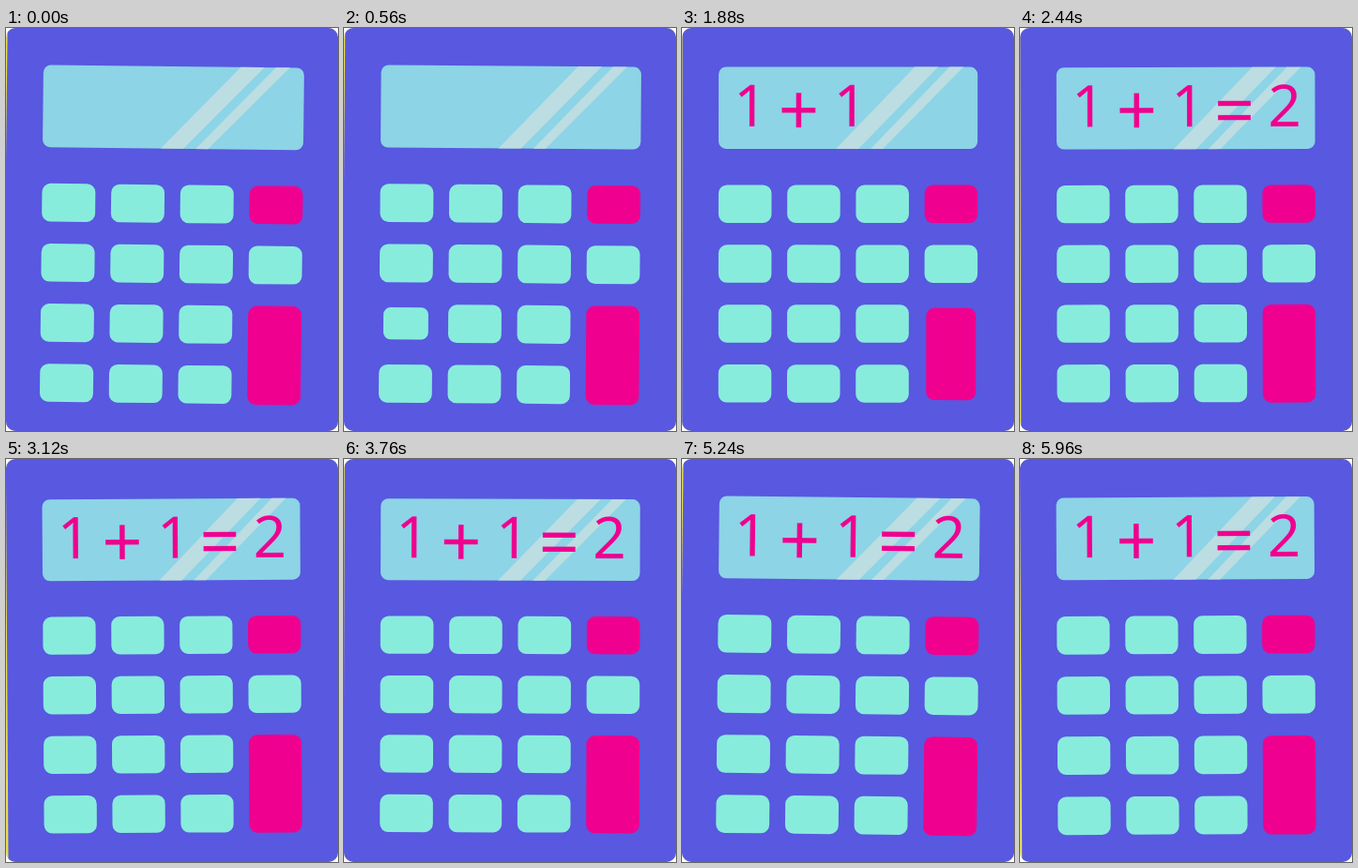
An HTML page that plays this animation: 354x430 px, repeating every 6 s.

```html
<!DOCTYPE html>
<html lang="en">
<head>
<meta charset="utf-8">
<title>Calculator</title>
<style>
  html, body { margin: 0; width: 100%; height: 100%; overflow: hidden; background: #fff; }
  svg { display: block; width: 354px; height: 430px; background: #e8dc50; border-radius: 10px; }
  text { font-family: "Noto Sans", "Open Sans", sans-serif; font-size: 62px; fill: #ef008f; text-anchor: middle; }
  .op { font-size: 76px; }
</style>
</head>
<body>
<svg viewBox="0 0 354 430">
  <g id="body">
    <rect x=".5" y="-6" width="358" height="442" rx="10" fill="#5858e0"/>
    <rect x="39" y="41.5" width="276" height="87.5" rx="8" fill="#8cd4e6"/>
    <path d="M248 41.5h25L188 129h-24zM285 41.5h15L214 129h-13z" fill="#bcdde2"/>
    <g id="keys"></g>
    <g id="display"></g>
  </g>
</svg>
<script>
const LOOP = 6000, FRAME = 40, PRESS = 320;
const $ = id => document.getElementById(id);

function add(parent, tag, attrs) {
  const el = document.createElementNS("http://www.w3.org/2000/svg", tag);
  for (const name in attrs) el.setAttribute(name, attrs[name]);
  return parent.appendChild(el);
}

function addKey(col, row, color, height = 40.5) {
  const x = 39 + col * 73.2, y = 167.5 + row * 63.9;
  const el = add($("keys"), "rect", { x, y, width: 56.5, height, rx: 9, fill: color });
  return { el, cx: x + 28.25, cy: y + height / 2 };
}

const keys = {};
for (let row = 0; row < 4; row++) {
  for (let col = 0; col < 4; col++) {
    if (col === 3 && row === 3) continue;
    const tall = col === 3 && row === 2;
    const pink = col === 3 && row !== 1;
    keys[`${col},${row}`] = addKey(col, row, pink ? "#ef008f" : "#88ecdc", tall ? 105 : undefined);
  }
}

const presses = [["0,2", 460], ["3,1", 920], ["0,2", 1380], ["3,2", 1840]];

// character, centre x, time it appears
const glyphs = [["1", 73, 700], ["+", 124.5, 1160], ["1", 179.5, 1620], ["=", 229, 2080], ["2", 282.5, 2080]]
  .map(([char, x, start]) => {
    const op = "+=".includes(char);
    const el = add($("display"), "text", { x, y: op ? 114.5 : 105, class: op ? "op" : "" });
    el.textContent = char;
    return { el, start };
  });

// time, tilt in degrees, vertical scale
const sway = [
  [0, .65, 1.0034], [1080, .25, 1.0073], [1880, .05, 1], [3120, -.35, .9947],
  [4280, .55, .9922], [5240, .6, 1.0034], [5960, -.3, 1.0042]
];

function pose(t) {
  let i = 0;
  while (i < sway.length - 2 && t > sway[i + 1][0]) i++;
  const a = sway[i], b = sway[i + 1];
  const p = Math.min(1, (t - a[0]) / (b[0] - a[0]));
  const ease = (1 - Math.cos(Math.PI * p)) / 2;
  return [1, 2].map(k => a[k] + (b[k] - a[k]) * ease);
}

function draw(now) {
  const t = Math.floor(now % LOOP / FRAME) * FRAME;
  const [tilt, sy] = pose(t);
  const sx = 1 + .0112 * tilt;
  $("body").setAttribute("transform",
    `translate(177 215) rotate(${tilt}) scale(${sx} ${sy}) translate(-177 -215)`);

  for (const id in keys) {
    const { el, cx, cy } = keys[id];
    let scale = 1;
    for (const [key, start] of presses) {
      if (key === id && t > start && t < start + PRESS) {
        scale = .75 + .25 * Math.abs((t - start) / PRESS * 2 - 1);
      }
    }
    el.setAttribute("transform", `translate(${cx} ${cy}) scale(${scale}) translate(${-cx} ${-cy})`);
  }
  for (const { el, start } of glyphs) el.style.visibility = t >= start ? "visible" : "hidden";
}

const begin = performance.now();
function tick() {
  draw(performance.now() - begin);
  requestAnimationFrame(tick);
}
tick();
</script>
</body>
</html>
```
